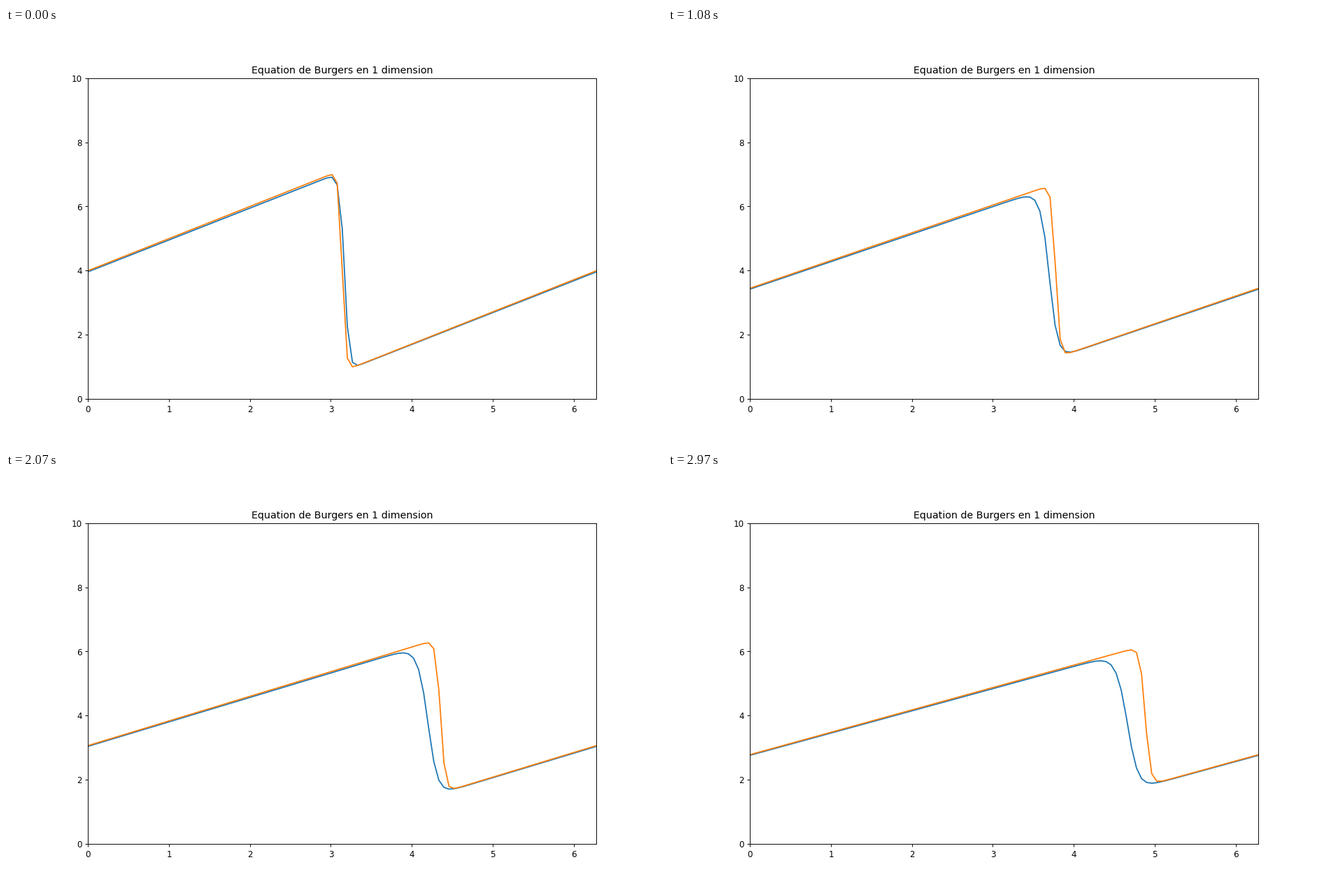
A matplotlib script that plays this animation: 938 px wide and 597 px high, repeating every 3000 ms.

```python
import numpy as np
import matplotlib.pyplot as plt
from matplotlib.animation import FuncAnimation

SIZE = (11, 7)
DPI = 85.29  # 938 by 597 pixels
FRAMES = 100
INTERVAL = 30

NX = 101
NU = 0.07
DX = 2 * np.pi / (NX - 1)
DT = DX * NU
LEAD = 2  # time steps the numerical curve is ahead of the exact one

x = np.linspace(0, 2 * np.pi, NX)


def exact(t):
    """Periodic saw-tooth solution of Burgers' equation."""
    a = x - 4 * t
    b = a - 2 * np.pi
    width = 4 * NU * (t + 1)
    ea, eb = np.exp(-a**2 / width), np.exp(-b**2 / width)
    dphi = -2 * (a * ea + b * eb) / width
    return 4 - 2 * NU * dphi / (ea + eb)


def step(u):
    """Upwind convection and centred diffusion, periodic in x."""
    v = u[:-1]
    left, right = np.roll(v, 1), np.roll(v, -1)
    v = (v - v * DT / DX * (v - left)
         + NU * DT / DX**2 * (right - 2 * v + left))
    return np.append(v, v[0])


states = [exact(0)]
for _ in range(FRAMES + LEAD):
    states.append(step(states[-1]))

fig, ax = plt.subplots(figsize=SIZE, dpi=DPI)
ax.set_xlim(0, 2 * np.pi)
ax.set_ylim(0, 10)
ax.set_title("Equation de Burgers en 1 dimension")
numeric, = ax.plot(x, states[LEAD])
analytic, = ax.plot(x, exact(0))


def update(n):
    numeric.set_ydata(states[n + LEAD])
    analytic.set_ydata(exact(n * DT))
    return numeric, analytic


anim = FuncAnimation(fig, update, frames=FRAMES, interval=INTERVAL,
                     repeat=True, repeat_delay=0)
plt.show()
```
